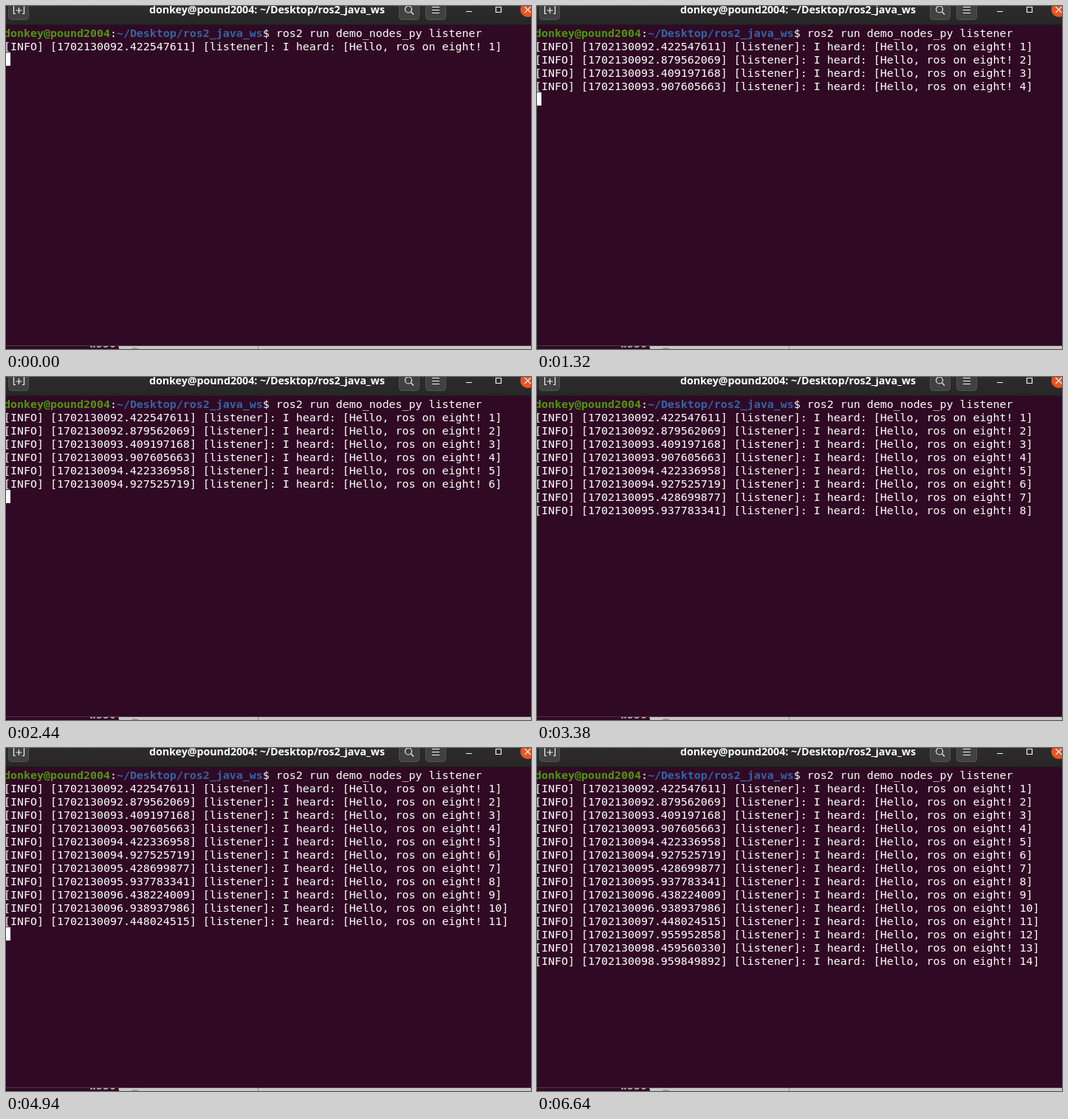
Write an HTML page that moves like this. It is 711 by 465 pixels and loops after 6840 ms.

```html
<!DOCTYPE html>
<html lang="en">
<head>
<meta charset="utf-8">
<title>Terminal listener</title>
<style>
  html, body { margin: 0; width: 100%; height: 100%; overflow: hidden; background: #300a24; }
  svg { display: block; }
  .mono { font: 14.95px "DejaVu Sans Mono", monospace; fill: #fff; }
  .bold { font-weight: bold; }
  .title { font: bold 14.2px "Open Sans", "Noto Sans", sans-serif; fill: #fff; }
  .button { fill: #424141; stroke: #555353; }
  .icon { fill: none; stroke: #f2f2f2; stroke-width: 1.2; }
</style>
</head>
<body>
<svg width="711" height="465" viewBox="0 0 711 465">
  <defs>
    <linearGradient id="bar" x2="0" y2="1">
      <stop offset="0" stop-color="#2d2b2b"/>
      <stop offset="1" stop-color="#282727"/>
    </linearGradient>
    <clipPath id="below"><rect y="461" width="153" height="4"/></clipPath>
  </defs>

  <rect width="711" height="465" fill="#300a24"/>

  <!-- title bar -->
  <rect width="711" height="25" fill="url(#bar)"/>
  <rect y="25" width="711" height="1" fill="#1c1a1b"/>
  <rect class="button" x="3.5" y="-8.5" width="27" height="27" rx="4"/>
  <path class="icon" d="M10.5 -1V10.5H13M24.5 -1V10.5H22M17.5 2V10M13.5 6H21.5"/>
  <rect class="button" x="532.5" y="-8.5" width="27" height="27" rx="4"/>
  <circle class="icon" cx="545" cy="4.5" r="4.5"/>
  <path class="icon" d="M548.5 8L552 11.5"/>
  <rect class="button" x="568.5" y="-8.5" width="27" height="27" rx="4"/>
  <path class="icon" d="M577 1.5H587M577 5.5H587M577 9.5H587"/>
  <path class="icon" d="M623 7.5H631M663.5 1.5H670.5V8.5H663.5Z"/>
  <circle cx="706.5" cy="5" r="10" fill="#e95420"/>
  <path class="icon" d="M702.5 1L710.5 9M710.5 1L702.5 9"/>
  <text class="title" x="513" y="10" text-anchor="end">donkey@pound2004: ~/Desktop/ros2_java_ws</text>

  <!-- window behind -->
  <rect y="460" width="711" height="1" fill="#4b3a45"/>
  <text class="mono bold" x="113" y="463" clip-path="url(#below)" style="fill:#b9adb5">w550.</text>
  <rect x="153" y="461" width="558" height="4" fill="#c9c8c7"/>
  <path d="M170 465Q174.500 462.500 179 465" fill="none" stroke="#77736f"/>
  <rect x="341" y="461" width="1" height="4" fill="#8f8c8a"/>

  <!-- terminal -->
  <text class="mono" x="-3" y="42"><tspan class="bold" fill="#4e9a06">donkey@pound2004</tspan>:<tspan class="bold" fill="#3465a4">~/Desktop/ros2_java_ws</tspan>$ ros2 run demo_nodes_py listener</text>
  <g id="log"></g>
  <rect id="cursor" width="6" height="18" fill="#fff"/>
</svg>
<script>
const LOOP = 6840, ROW = 18, TOP = 45;
const stamps = [
  "092.422547611", "092.879562069", "093.409197168", "093.907605663", "094.422336958",
  "094.927525719", "095.428699877", "095.937783341", "096.438224009", "096.938937986",
  "097.448024515", "097.955952858", "098.459560330", "098.959849892"
];
const arrivals = [0, 280, 860, 1320, 1840, 2440, 2860, 3380, 3880, 4340, 4940, 5340, 5860, 6360];
const blinks = [480, 1060, 1640, 2240, 2860, 3580, 4140, 4740, 5340, 6060, 6640];

const log = document.getElementById("log");
const cursor = document.getElementById("cursor");

const lines = stamps.map((stamp, i) => {
  const line = document.createElementNS("http://www.w3.org/2000/svg", "text");
  line.setAttribute("class", "mono");
  line.setAttribute("x", -3);
  line.setAttribute("y", TOP + ROW * i + 15);
  line.textContent = `[INFO] [1702130${stamp}] [listener]: I heard: [Hello, ros on eight! ${i + 1}]`;
  return log.appendChild(line);
});

const passed = (times, t) => times.filter(at => at <= t).length;
const show = (el, on) => el.setAttribute("visibility", on ? "visible" : "hidden");

function draw(t) {
  const count = passed(arrivals, t);
  lines.forEach((line, i) => show(line, i < count));
  cursor.setAttribute("y", TOP + ROW * count);
  show(cursor, passed(blinks, t) % 2 === 0);
}

const start = performance.now();
function tick() {
  draw((performance.now() - start) % LOOP);
  requestAnimationFrame(tick);
}
tick();
</script>
</body>
</html>
```
